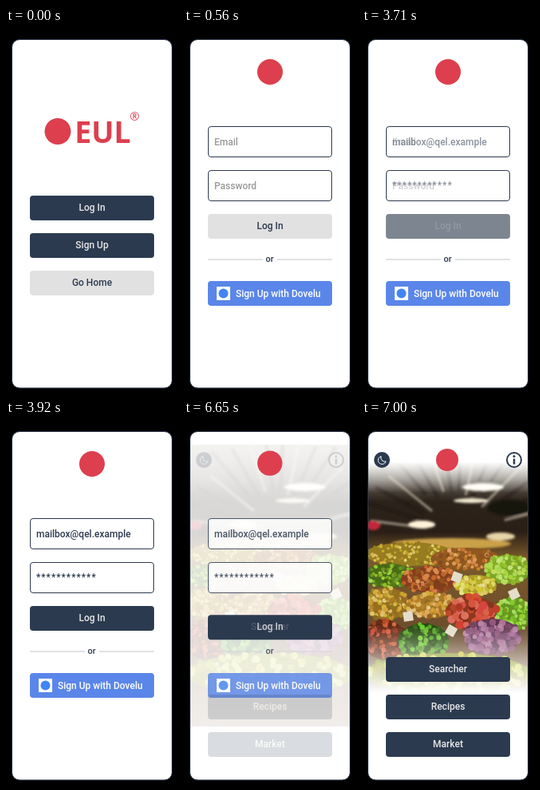
Recreate the animation shown at these times as an HTML page. Size 216x456 px, loop 8000 ms.

```html
<!DOCTYPE html>
<html lang="en">
<head>
<meta charset="utf-8">
<title>Sign-in flow</title>
<style>
  html, body { margin: 0; width: 100%; height: 100%; overflow: hidden; background: #000; }
  svg { display: block; width: 100%; height: 100%; }
  text { font: 500 12px Roboto, sans-serif; fill: #2b3a4f; }
  .mid { text-anchor: middle; }
  .light { fill: #e8e8e8; }
  .hint { fill: #999; }
  .brand { fill: #dd3f4e; }
  .word { font: 700 37.5px "Open Sans", sans-serif; }
  .reg { font: 400 14.5px "Noto Sans", sans-serif; }
  .field { fill: #fff; stroke: #2b3a4f; }
</style>
</head>
<body>
<svg viewBox="0 0 216 456">
  <defs>
    <clipPath id="photoClip"><rect x="8" y="31" width="200" height="353"/></clipPath>
    <filter id="soft"><feGaussianBlur stdDeviation="0.6"/></filter>
    <filter id="haze"><feGaussianBlur stdDeviation="1.8"/></filter>
    <linearGradient id="stall" x2="0" y2="1">
      <stop offset="0" stop-color="#b5aea0"/>
      <stop offset=".12" stop-color="#6d665c"/>
      <stop offset=".2" stop-color="#2c231b"/>
      <stop offset=".31" stop-color="#2a1f16"/>
      <stop offset=".4" stop-color="#7a5a2a"/>
      <stop offset=".7" stop-color="#6a4a2c"/>
      <stop offset="1" stop-color="#a08a70"/>
    </linearGradient>
    <linearGradient id="veil" x2="0" y2="1">
      <stop offset="0" stop-color="#fff"/>
      <stop offset=".06" stop-color="#fff"/>
      <stop offset=".17" stop-color="#fff" stop-opacity="0"/>
      <stop offset=".64" stop-color="#fff" stop-opacity="0"/>
      <stop offset=".88" stop-color="#fff"/>
      <stop offset="1" stop-color="#fff"/>
    </linearGradient>
  </defs>

  <rect x="7.5" y="14.5" width="201" height="436.5" rx="9.5" fill="#fff"/>
  <g id="photo" clip-path="url(#photoClip)">
    <rect x="8" y="31" width="200" height="353" fill="url(#stall)"/>
    <g id="lamps" filter="url(#haze)"></g>
    <g id="produce" filter="url(#soft)"></g>
  </g>
  <rect id="fade" x="8" y="31" width="200" height="353" fill="url(#veil)"/>

  <g id="home">
    <text class="brand word mid" x="121.500" y="143.500">EUL</text>
    <text class="brand reg mid" x="161.500" y="116.300">®</text>
  </g>

  <g id="form">
    <rect class="field" x="30.5" y="123.5" width="155" height="38" rx="3.5"/>
    <rect class="field" x="30.5" y="178.5" width="155" height="38" rx="3.5"/>
    <g id="hints">
      <text class="hint" x="38" y="146.500">Email</text>
      <text class="hint" x="38" y="201.500">Password</text>
    </g>
    <g id="typed">
      <text x="38" y="146.500">mailbox@qel.example</text>
      <text x="38" y="200.500" letter-spacing="1">************</text>
    </g>
    <path d="M30 290H99M117 290H186" stroke="#d6d8da" stroke-width="1.500"/>
    <text class="mid" x="107.500" y="293" style="font-size:11px">or</text>
    <rect x="30" y="317" width="156" height="31" rx="4" fill="#5a86e9"/>
    <rect x="41" y="324" width="17" height="17" fill="#fff"/>
    <circle cx="49.500" cy="332.500" r="6" fill="#4285f4"/>
    <text x="65" y="337" style="fill:#fff">Sign Up with Dovelu</text>
  </g>

  <g id="menu">
    <circle cx="25" cy="50" r="10" fill="#2b3a4f"/>
    <path d="M24 45.500A5 5 0 1 0 30 52A5 5 0 0 1 24 45.500Z" fill="none" stroke="#fff"/>
    <circle cx="191" cy="50" r="9" fill="#fff" stroke="#2b3a4f" stroke-width="2"/>
    <path d="M191 48.500V55.500" stroke="#2b3a4f" stroke-width="2.500"/>
    <circle cx="191" cy="45.500" r="1.500" fill="#2b3a4f"/>
  </g>

  <g id="main">
    <rect id="mainBox" x="30" width="156" height="31" rx="4"/>
    <text id="logIn" class="mid" x="108" y="19">Log In</text>
    <text id="searcher" class="mid light" x="108" y="19">Searcher</text>
  </g>
  <circle id="logo" class="brand"/>
  <rect x="7.5" y="14.5" width="201" height="436.5" rx="9.5" fill="none" stroke="#2b3a4f"/>
</svg>

<script>
const NAVY = [43, 58, 79], GREY = [225, 225, 225], PALE = [232, 232, 232];
const LOOP = 8000, STEP = 70;
const $ = id => document.getElementById(id);

function add(parent, tag, attrs, text = "") {
  const el = document.createElementNS("http://www.w3.org/2000/svg", tag);
  for (const key in attrs) el.setAttribute(key, attrs[key]);
  el.textContent = text;
  return parent.appendChild(el);
}

function addButton(parent, y, label, dark = true) {
  add(parent, "rect", { x: 30, y, width: 156, height: 31, rx: 4, fill: dark ? "#2b3a4f" : "#e1e1e1" });
  add(parent, "text", { x: 108, y: y + 19, class: dark ? "mid light" : "mid" }, label);
}
addButton($("home"), 257, "Sign Up");
addButton($("home"), 304, "Go Home", false);
addButton($("menu"), 344, "Recipes");
addButton($("menu"), 391, "Market");

let seed = 11;
const random = () => (seed = seed * 16807 % 2147483647) / 2147483647;

// Ceiling beams fan out from one vanishing point.
for (let i = 0; i < 16; i++) {
  const angle = Math.PI * (1.04 + i / 17), near = 40 + 25 * random();
  const point = reach => `${120 + reach * Math.cos(angle)} ${140 + reach * Math.sin(angle)}`;
  add($("lamps"), "path", {
    d: `M${point(near)}L${point(near + 70)}`,
    stroke: i % 3 ? "#1d1712" : "#d8cdb8", "stroke-width": 3, opacity: .65
  });
}

// x, y, half width, half height, colour
for (const [cx, cy, rx, ry, fill] of [
  [75, 131, 17, 5, "#fff3d8"], [152, 84, 26, 5, "#fffdf2"], [137, 101, 22, 3, "#f4ead2"],
  [185, 110, 28, 10, "#17120e"], [14, 132, 9, 6, "#c3283a"],
  [112, 155, 75, 7, "#caa04a"], [174, 146, 18, 5, "#e7d5a8"]
]) add($("lamps"), "ellipse", { cx, cy, rx, ry, fill });

// x, y, half width, half height, hue, lightness, count, fruit radius
for (const [cx, cy, rx, ry, hue, light, count, r] of [
  [60, 168, 56, 15, 42, 52, 120, 2], [130, 174, 44, 14, 24, 50, 90, 2.5],
  [35, 195, 34, 15, 75, 42, 90, 2.5], [85, 200, 36, 16, 18, 48, 90, 3],
  [183, 187, 28, 18, 72, 56, 110, 3], [143, 207, 26, 13, 48, 58, 70, 3],
  [30, 230, 29, 20, 38, 52, 90, 3], [87, 232, 31, 16, 32, 55, 80, 3],
  [190, 243, 24, 21, 78, 52, 80, 3], [137, 240, 32, 19, 2, 50, 60, 5],
  [28, 275, 27, 25, 8, 40, 90, 3], [77, 277, 32, 22, 90, 34, 90, 3],
  [164, 271, 35, 22, 315, 46, 110, 4], [108, 318, 105, 26, 55, 52, 150, 4]
]) {
  const sat = hue === 315 ? 26 : 64;
  const color = shift => `hsl(${hue + random() * 12} ${sat}% ${light + shift}%)`;
  add($("produce"), "ellipse", { cx, cy, rx, ry, fill: color(-16) });
  for (let i = 0; i < count; i++) {
    const angle = random() * 2 * Math.PI, reach = Math.sqrt(random());
    add($("produce"), "circle", {
      cx: cx + rx * reach * Math.cos(angle), cy: cy + ry * reach * Math.sin(angle),
      r: r * (.7 + .4 * random()), fill: color(random() * 36 - 20)
    });
  }
}
for (const [x, y, turn] of [[119, 197, 20], [112, 264, 30], [58, 246, -8], [191, 218, -25]])
  add($("produce"), "rect", {
    x: x - 6, y: y - 6, width: 12, height: 12, fill: "#e4ddcb", transform: `rotate(${turn} ${x} ${y})`
  });

function progress(time, start, end) {
  const t = Math.min(1, Math.max(0, (time - start) / (end - start)));
  return (1 - Math.cos(Math.PI * t)) / 2;
}
const mix = (a, b, p) => a + (b - a) * p;
const blend = (a, b, p) => `rgb(${a.map((v, i) => Math.round(mix(v, b[i], p)))})`;
const show = (id, opacity) => $(id).style.opacity = opacity;

function draw(now) {
  const time = Math.floor(now % LOOP / STEP) * STEP;
  const open = progress(time, 110, 560);
  const fill = progress(time, 3470, 3920);
  const enter = progress(time, 6518, 7000);
  const grey = open * (1 - fill);

  show("home", 1 - open);
  show("form", open * (1 - enter));
  show("hints", 1 - fill);
  show("typed", fill);
  for (const id of ["photo", "fade", "menu", "searcher"]) show(id, enter);
  show("logIn", 1 - enter);

  const y = mix(mix(210, 233, open), 297, enter);
  $("main").setAttribute("transform", `translate(0 ${y})`);
  $("mainBox").style.fill = blend(NAVY, GREY, grey);
  $("logIn").style.fill = blend(PALE, NAVY, grey);

  $("logo").setAttribute("cx", mix(mix(65, 108, open), 107, enter));
  $("logo").setAttribute("cy", mix(mix(129.5, 55, open), 50, enter));
  $("logo").setAttribute("r", mix(mix(16.5, 16, open), 14, enter));
}

const begin = performance.now();
function tick() {
  draw(performance.now() - begin);
  requestAnimationFrame(tick);
}
tick();
</script>
</body>
</html>
```
